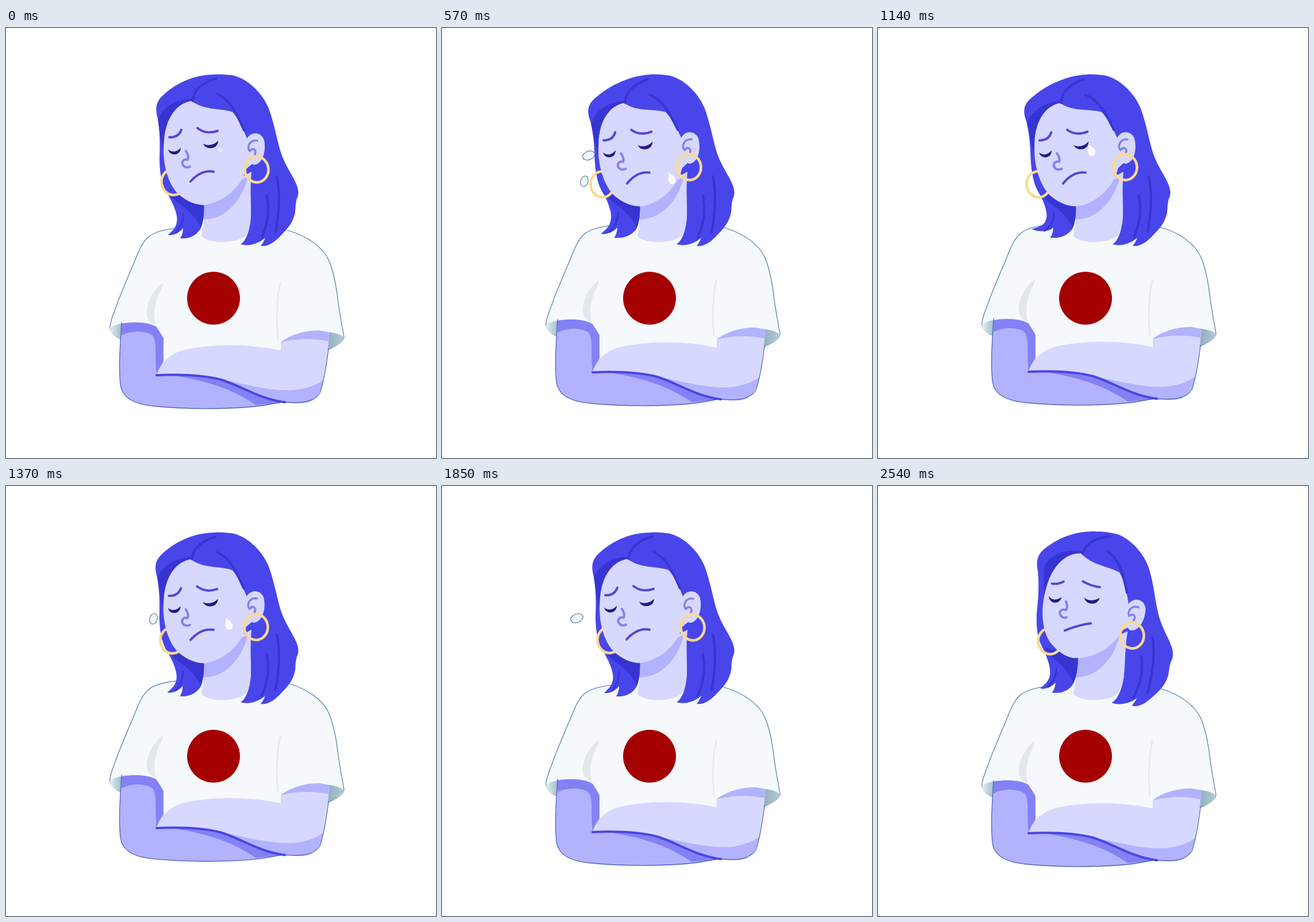
Write an HTML page with a canvas that moves like this. It is 748x748 px and loops after 2.61 s.

```html
<!DOCTYPE html>
<html lang="en">
<head>
<meta charset="utf-8">
<title>Sobbing woman</title>
<style>
html, body { margin: 0; width: 100%; height: 100%; overflow: hidden; background: #fff; }
canvas { display: block; width: 748px; height: 748px; }
</style>
</head>
<body>
<canvas id="stage" width="748" height="748"></canvas>
<script>
const ctx = document.getElementById('stage').getContext('2d');
const LOOP = 2610;
const HAIR = '#4846ea', HAIR_DARK = '#3735d2', SKIN = '#d7d8ff', SHADE = '#b3b2ff';
const DEEP = '#8481f6', LINE = '#5148d6', SOFT_LINE = '#8680ec', LASH = '#1f1b8a';
const SHIRT = '#f5f9fc', EDGE = '#4d78ab', ARM_EDGE = '#4a66b8', GOLD = '#fbd98f', EMBLEM = '#a50000';

const clamp = (v, lo = 0, hi = 1) => Math.min(hi, Math.max(lo, v));
const smooth = u => u * u * (3 - 2 * u);
const mix = (a, b, u) => a + (b - a) * u;

// Eased value of a list of [time, value] keys.
function keyed(t, keys) {
  for (let i = 1; i < keys.length; i++) {
    const [t0, a] = keys[i - 1], [t1, b] = keys[i];
    if (t <= t1) return mix(a, b, smooth((t - t0) / (t1 - t0)));
  }
  return keys[keys.length - 1][1];
}

const BREATH = [[0, 0], [250, -3], [430, -7], [570, -5], [830, -1.5], [1080, -4],
                [1140, -6], [1480, -10], [1660, -10], [1850, -2], [2160, 0]];
const SWAY = [[0, 0], [500, 1], [1140, 1], [1520, -0.25], [1660, -0.25], [1850, 0]];
const LIFT = [[0, 0], [2230, 0], [2540, 1]];
const FLICK = [[0, 0], [950, 0], [1130, 1], [1180, 1], [1400, 0]];

function fill(d, color) {
  ctx.fillStyle = color;
  ctx.fill(new Path2D(d));
}

function stroke(d, color, width) {
  ctx.strokeStyle = color;
  ctx.lineWidth = width;
  ctx.stroke(new Path2D(d));
}

// Curve through start, control and end, blended between two sets of points.
function morphLine(from, to, u) {
  const p = from.map((v, i) => mix(v, to[i], u));
  stroke(`M${p[0]},${p[1]} Q${p[2]},${p[3]} ${p[4]},${p[5]}`, LINE, 4);
}

function ellipse(x, y, rx, ry, angle = 0) {
  ctx.beginPath();
  ctx.ellipse(x, y, rx, ry, angle, 0, Math.PI * 2);
}

function rotateAbout(angle, x, y) {
  ctx.translate(x, y);
  ctx.rotate(angle);
  ctx.translate(-x, -y);
}

function ring(x, y) {
  ellipse(x, y, 20.5, 22.5, -0.1);
  ctx.strokeStyle = GOLD;
  ctx.lineWidth = 4.5;
  ctx.stroke();
}

function drawBody() {
  const outer = 'M201,512 C198,560 196,590 199,620 C202,645 225,655 260,658 C320,664 400,663 445,657 L485,650';
  const foldEdge = 'C440,645 410,623 375,612 C345,604 310,602 262,604';
  const shirt = 'M300,348 C278,350 258,354 247,364 C236,374 230,390 222,410 C212,433 203,455 195,475' +
    ' C190,490 183,505 181,517 C179,529 190,537 200,541 L274,590 L478,590 L561,559 C575,553 588,546 588,537' +
    ' C585,520 580,495 577,470 C574,445 570,425 562,405 C552,382 525,362 490,352';
  fill(shirt + ' L420,338 L330,338 Z', SHIRT);
  stroke(shirt, EDGE, 1.2);

  const left = ctx.createLinearGradient(181, 0, 204, 0);
  left.addColorStop(0, '#e3eef3');
  left.addColorStop(1, '#98b5c4');
  fill('M181,522 C187,517 194,515 202,514 L200,541 C188,537 181,531 181,522Z', left);
  const right = ctx.createLinearGradient(560, 0, 588, 0);
  right.addColorStop(0, '#93afc0');
  right.addColorStop(1, '#b4cbd5');
  fill('M561,529 C572,530 582,533 588,538 C587,547 575,554 559,559Z', right);

  fill('M273,443 C255,457 243,480 245,500 C247,510 255,513 261,518 C255,500 258,475 272,450Z', '#e3e8ed');
  stroke('M477,444 C471,470 470,510 473,540', '#e6ebee', 3);

  fill(outer + ' L440,620 L340,598 L262,604 L274,578 L274,540 C265,520 255,510 201,515Z', SHADE);
  fill('M201,514 C225,510 250,512 262,520 L274,540 L274,580 L262,602 C258,570 264,548 255,535' +
       ' C245,526 215,526 201,535Z', DEEP);
  fill('M300,602 L380,600 L475,645 L475,652 L435,656 C405,636 370,618 300,606Z', DEEP);
  stroke(outer, ARM_EDGE, 1.3);

  fill('M478,546 C495,533 520,527 545,527 L562,530 C562,550 557,580 553,605 C548,640 535,653 510,653' +
       ` L485,651 ${foldEdge} C268,580 290,565 310,560 C360,549 420,549 478,561Z`, SKIN);
  fill('M376,612 C420,620 460,632 500,630 C520,628 540,622 552,612 C547,640 535,653 510,653' +
       ' L485,651 C440,645 410,623 376,612Z', SHADE);
  fill('M478,547 C495,533 520,526 545,526 L562,529 L561,545 C530,538 500,541 478,547Z', SHADE);
  stroke('M561,558 C557,590 553,615 546,635 C538,648 522,654 485,651', ARM_EDGE, 1.3);
  stroke('M485,651 ' + foldEdge, '#4a44e4', 4);
}

function drawNeck() {
  fill('M343,290 L344,340 L340,362 C352,375 395,377 416,362 L432,335 L438,228Z', SKIN);
  fill('M342,300 L421,258 C414,287 400,308 380,322 C368,330 354,333 342,333Z', SHADE);
}

// Hair follows the head only partly, so its points are bent one by one.
function hairBend(sway, lift, flick) {
  const c = Math.cos(0.07 * lift), s = Math.sin(0.07 * lift);
  return d => d.replace(/([\d.]+),([\d.]+)/g, (_, px, py) => {
    let x = +px, y = +py;
    const side = clamp((340 - x) / 60) * sway;
    const above = Math.max(0, 250 - y);
    const low = clamp((y - 300) / 40);
    const tip = low * clamp((300 - x) / 18) * flick;
    const dx = x - (0.064 * above + 6 * low) * side - 9 * tip - 378;
    const dy = y + (0.05 * above - 2 * low) * side - 8 * tip - 285;
    x = 378 + dx * c - dy * s + 5 * lift;
    y = 285 + dx * s + dy * c - lift;
    return x.toFixed(2) + ',' + y.toFixed(2);
  });
}

const HAIR_SHAPE = 'M264,158 C259,140 261,130 270,120 C292,98 325,81 362,81 C372,80 385,81 397,83' +
  ' C423,90 447,115 457,140 C468,170 472,200 480,222 C487,240 497,255 502,265 C508,277 511,287 506,297' +
  ' C502,310 505,318 501,328 C497,341 488,351 479,360 C468,372 456,381 443,379 C447,374 449,370 451,365' +
  ' C437,377 420,380 408,376 C418,370 424,352 426,330 C427,305 424,285 427,250 L344,295' +
  ' C345,318 344,340 338,350 C330,362 318,367 303,366 C307,360 308,354 308,348 C304,354 292,362 282,360' +
  ' C290,352 295,348 297,338 C300,325 290,305 283,292 C272,275 268,260 267,230 C268,205 268,180 264,158Z';

function drawHair(bend) {
  fill(bend(HAIR_SHAPE), HAIR);
  fill(bend('M284,288 L344,300 C345,320 344,335 339,347 C334,335 322,322 310,312' +
            ' C300,305 290,298 284,288Z'), HAIR_DARK);
  stroke(bend('M308,323 C308,338 304,347 296,356'), HAIR_DARK, 3);
  stroke(bend('M471,258 C478,290 474,328 469,355'), HAIR_DARK, 4);
  stroke(bend('M454,292 C459,320 454,345 445,364'), HAIR_DARK, 4);
}

function turnHead(sway, lift) {
  rotateAbout(0.2 * lift, 386, 277);
  rotateAbout(-0.05 * sway, 392, 252);
}

function drawFringeShade(bend, sway, lift) {
  ctx.save();
  ctx.clip(new Path2D(bend(HAIR_SHAPE)));
  turnHead(sway, lift);
  fill('M327,123 C300,122 272,136 264,160 C266,175 268,190 274,215 L290,170Z', HAIR_DARK);
  ctx.restore();
}

function drawCheekTear(t) {
  const s = t < 1050 ? t : t - 1050;
  if (t > 1750 || s > 660) return;
  const e = smooth(clamp((s - 60) / 480));
  const size = clamp(0.5 + s / 150);
  ctx.save();
  ctx.globalAlpha = size * clamp((660 - s) / 70);
  ctx.translate(373 + 26 * e, 212 + 51 * e);
  ctx.rotate(-0.15);
  ctx.scale(size, size);
  fill('M-3,-12 C3,-7 7,-2 6,4 C5,11 -4,11 -6,4 C-7,-2 -4,-5 -3,-12Z', '#fafbff');
  ctx.restore();
}

function drawHead(t, sway, lift) {
  ctx.save();
  turnHead(sway, lift);
  fill('M323,127 C298,130 278,155 275,195 C271,230 280,270 300,289 C315,302 330,308 345,308' +
       ' C380,303 410,275 418,245 L430,235 L419,192 C412,174 404,157 394,146' +
       ' C370,139 343,143 323,127Z', SKIN);

  ctx.save();
  ctx.translate(2 * lift, 3 * lift);
  fill('M417,198 C421,180 443,178 449,195 C453,215 446,236 432,238 C424,238 418,225 416,214Z', SKIN);
  stroke('M437,196 C424,194 418,207 424,214 C430,207 436,212 433,220', SOFT_LINE, 3.6);
  ctx.restore();

  stroke('M366,88 C340,95 325,110 325,127', HAIR_DARK, 4);
  stroke('M368,115 C392,125 404,155 414,178', HAIR_DARK, 4);

  morphLine([284, 190, 300, 191, 305, 177], [283, 188.5, 294, 188, 302, 181], lift);
  morphLine([333, 174, 348, 186, 368, 179], [335, 174, 350, 179, 366, 178], lift);
  morphLine([321, 267, 340, 246, 361, 250], [321, 264, 344, 249, 363, 243], lift);

  fill('M282,211 C288,217 298,216 304,208 C304,223 285,224 282,211Z', LASH);
  fill('M343,201 C350,206 362,204 369,196 C369,212 347,213 343,201Z', LASH);
  stroke('M313,214 C317,220 318,225 316,229 C307,227 304,235 309,240 C312,243 317,243 320,241', SOFT_LINE, 4);

  drawCheekTear(t);
  ctx.restore();
}

function drop(x, y, rx, ry, angle, alpha) {
  ctx.globalAlpha = alpha;
  ellipse(x, y, rx, ry, angle);
  ctx.fillStyle = '#eff6f9';
  ctx.fill();
  ctx.strokeStyle = '#7591a5';
  ctx.lineWidth = 1.4;
  ctx.stroke();
  ctx.globalAlpha = 1;
}

function drawFlyingTears(t, sway) {
  for (const start of [450, 1470]) {
    const s = t - start;
    if (s > 0 && s < 440) {
      drop(265 - 0.08 * s, 213 + 17 * (s / 380) ** 2 + 7 * Math.max(0, sway),
           11, 7.5, -0.35, clamp((440 - s) / 50));
    }
  }
  for (const start of [250, 1250]) {
    const s = t - start, u = s / 310;
    if (s > 0 && s < 400) {
      drop(262 - 14 * u, 225 + 39 * u * u, 6.5, 9.5, 0.3, clamp((400 - s) / 60));
    }
  }
}

function draw(t) {
  const sway = keyed(t, SWAY), lift = keyed(t, LIFT);
  const bend = hairBend(sway, lift, keyed(t, FLICK));
  ctx.fillStyle = '#fff';
  ctx.fillRect(0, 0, 748, 748);
  ctx.lineCap = ctx.lineJoin = 'round';

  ctx.save();
  ctx.translate(0, keyed(t, BREATH));
  drawBody();
  ctx.restore();

  ellipse(361, 470, 46, 46);
  ctx.fillStyle = EMBLEM;
  ctx.fill();

  drawNeck();
  drawFlyingTears(t, sway);
  drawHair(bend);
  drawFringeShade(bend, sway, lift);
  ring(291 - 12 * sway + 8 * lift, 268 + 4 * sway + 2 * lift);
  drawHead(t, sway, lift);
  ring(436 - 6 * sway + 6 * lift, 246 - 4 * sway + 14 * lift);
}

function tick() {
  draw(performance.now() % LOOP);
  requestAnimationFrame(tick);
}
tick();
</script>
</body>
</html>
```
